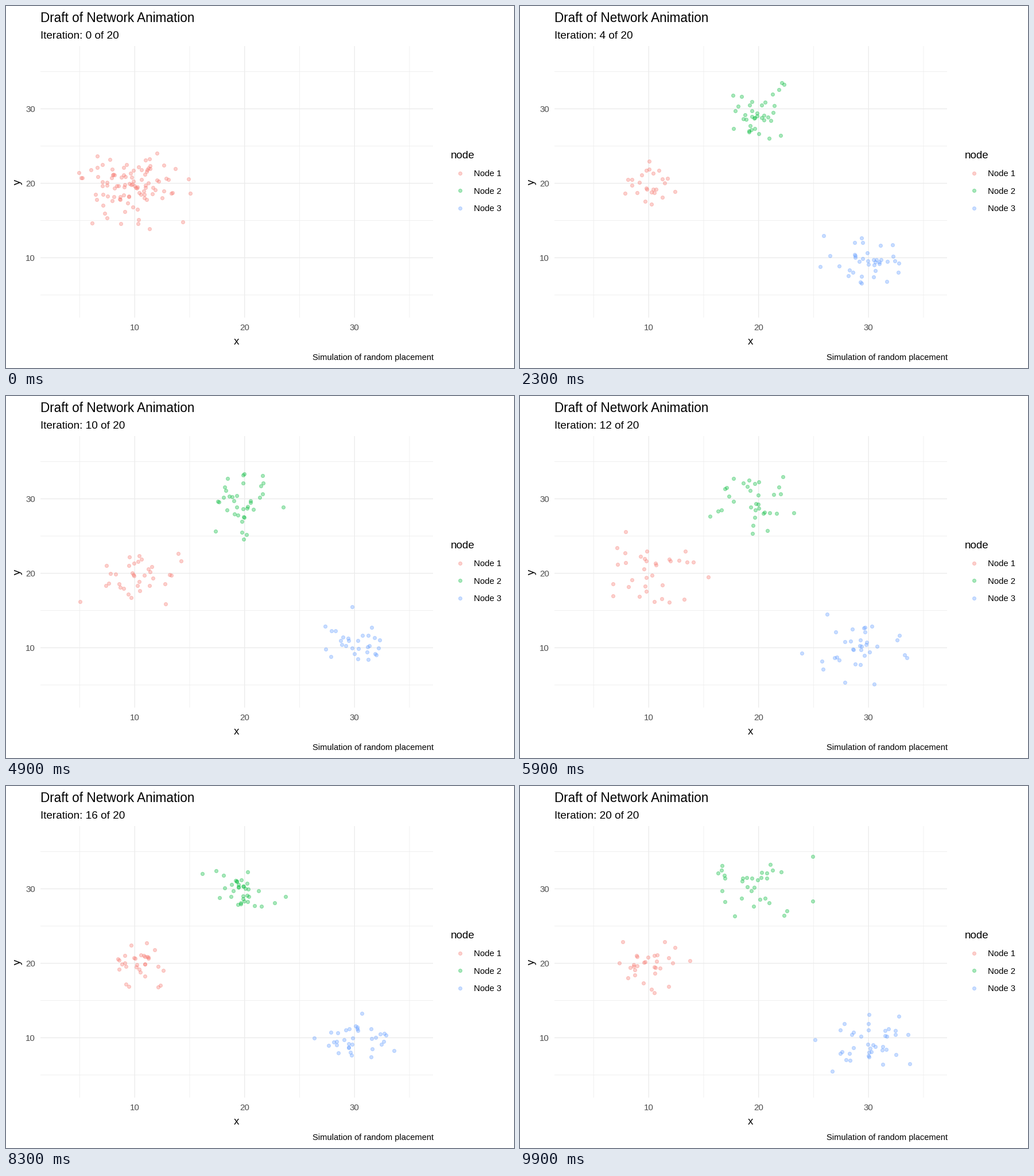
A matplotlib script for the animation above (10000 ms loop, 885 px wide and 632 px high).

```python
import numpy as np
import matplotlib.pyplot as plt
from matplotlib.animation import FuncAnimation
from matplotlib.colors import to_rgba

W, H, DPI = 885, 632, 64
PT = 72 / DPI
STATES = 20
POINTS = 100
SPREAD = 2.05
ALPHA = 0.34
COLORS = ["#F8766D", "#00BA38", "#619CFF"]
CENTERS = [(10, 20), (20, 30), (30, 10)]

# Frames on which a move starts; the last few pauses are shorter.
STARTS = [*range(3, 84, 5), *range(87, 100, 4)]


def sx(x):
    return 32.7 + 19.15 * x


def sy(y):
    return 569.5 - 13 * y


def simulate():
    """All points start at the first node, then pick a node at random."""
    rng = np.random.default_rng(20)
    states = []
    for k in range(STATES + 1):
        split = rng.multinomial(POINTS, [1 / 3] * 3) if k else (POINTS, 0, 0)
        states.append([rng.normal(c, SPREAD, (n, 2))
                       for c, n in zip(CENTERS, split)])
    return states


plt.rcParams["font.family"] = "Liberation Sans"
fig = plt.figure(figsize=(W / DPI, H / DPI), dpi=DPI, facecolor="white")
ax = fig.add_axes([0, 0, 1, 1])
ax.set_xlim(0, W)
ax.set_ylim(H, 0)
ax.axis("off")


def label(x, y, text, size, color="black", ha="left", **kw):
    return ax.text(x, y, text, fontsize=size * PT, color=color, ha=ha,
                   va="baseline", **kw)


def dots(x, y, color):
    rgba = to_rgba(color, ALPHA)
    return ax.scatter(x, y, s=(6 * PT) ** 2, facecolors=[rgba],
                      edgecolors=[rgba], linewidths=1.1 * PT, zorder=3)


def grid(values, width):
    style = dict(color="#EBEBEB", lw=width * PT, snap=False,
                 solid_capstyle="butt", zorder=1)
    for v in values:
        ax.plot([sx(v)] * 2, [70, 544], **style)
        ax.plot([60, 744], [sy(v)] * 2, **style)


grid(range(5, 36, 10), 0.7)
grid(range(10, 31, 10), 1.36)
for v in range(10, 31, 10):
    label(sx(v), 565.5, str(v), 15, "#4D4D4D", "center")
    label(50.8, sy(v) + 5.8, str(v), 15, "#4D4D4D", "right")

label(60, 28, "Draft of Network Animation", 22.55)
subtitle = label(60, 57.3, "", 18.95)
label(401.3, 591.3, "x", 18.7, ha="center")
label(24.5, 307.5, "y", 18.7, ha="center", rotation=90,
      rotation_mode="anchor")
label(744.5, 618.3, "Simulation of random placement", 14.65, ha="right")

label(775, 265.5, "node", 18.8)
for g, color in enumerate(COLORS):
    y = 291.7 + 30.5 * g
    dots([790.5], [y], color)
    label(814.8, y + 5.7, f"Node {g + 1}", 14.9)

states = simulate()
clouds = [dots([], [], color) for color in COLORS]


def update(i):
    k = sum(s < i for s in STARTS)
    after = states[(k + 1) % (STATES + 1)]
    for g, art in enumerate(clouds):
        pts = states[k][g].copy()
        if i in STARTS:
            # Points without a partner wait until the move ends.
            n = min(len(pts), len(after[g]))
            pts[:n] = (pts[:n] + after[g][:n]) / 2
        art.set_offsets(np.column_stack([sx(pts[:, 0]), sy(pts[:, 1])]))
    subtitle.set_text(f"Iteration: {k} of {STATES}")
    return [*clouds, subtitle]


anim = FuncAnimation(fig, update, frames=100, interval=100, repeat=True,
                     repeat_delay=0, blit=False)
plt.show()
```
